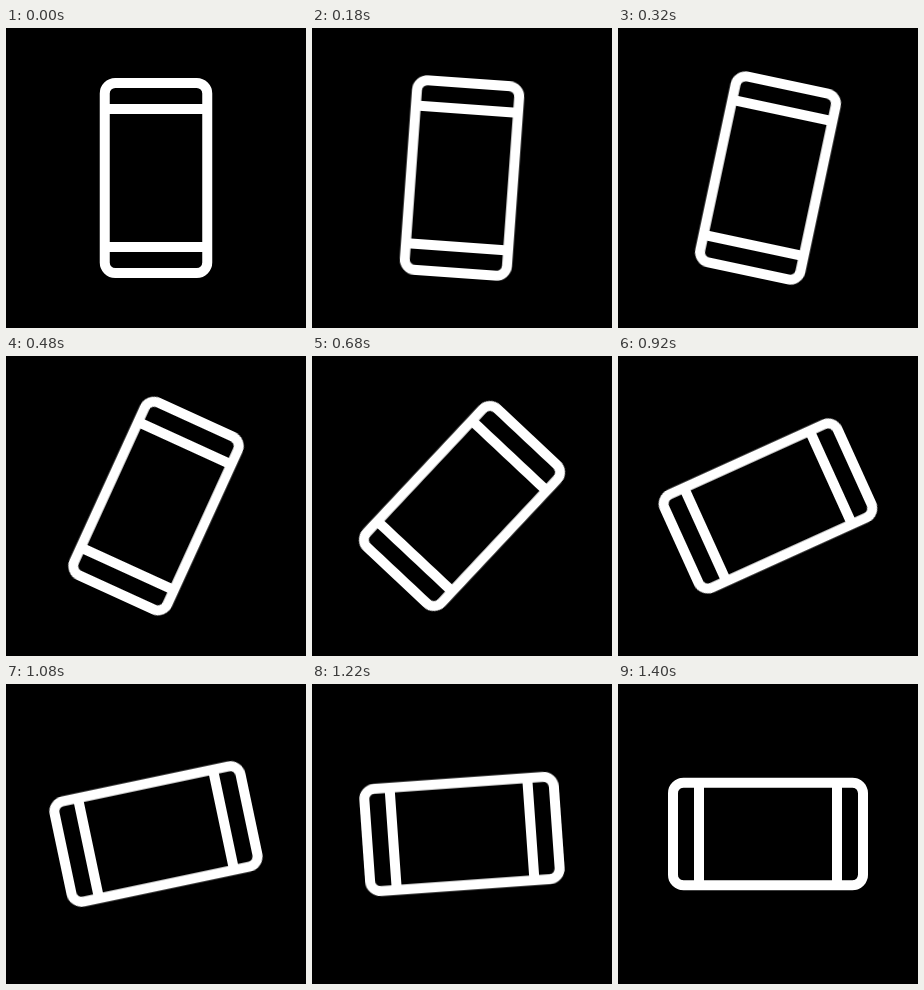
An HTML page that plays this animation: 300 by 300 pixels, repeating every 2000 ms.

```html
<!DOCTYPE html>
<html lang="en">
<head>
<meta charset="utf-8">
<title>Rotating phone</title>
<style>
  html, body {
    margin: 0;
    width: 100%;
    height: 100%;
    overflow: hidden;
    background: #000;
  }
  svg {
    display: block;
    width: 100%;
    height: 100%;
  }
  .phone {
    fill: none;
    stroke: #fff;
    stroke-width: 10;
    transform-origin: 150px 150px;
    animation: turn 2s infinite;
  }
  /* Turn for 1.4s, rest on the side, then snap back upright. */
  @keyframes turn {
    0% {
      transform: rotate(0deg);
      animation-timing-function: cubic-bezier(.3333, 0, .6667, 1);
    }
    70%, 100% { transform: rotate(90deg); }
  }
</style>
</head>
<body>
<svg viewBox="0 0 300 300">
  <g class="phone">
    <rect x="98.75" y="55" width="102.5" height="190" rx="10.5"/>
    <path d="M99 81H201M99 219H201"/>
  </g>
</svg>
</body>
</html>
```
